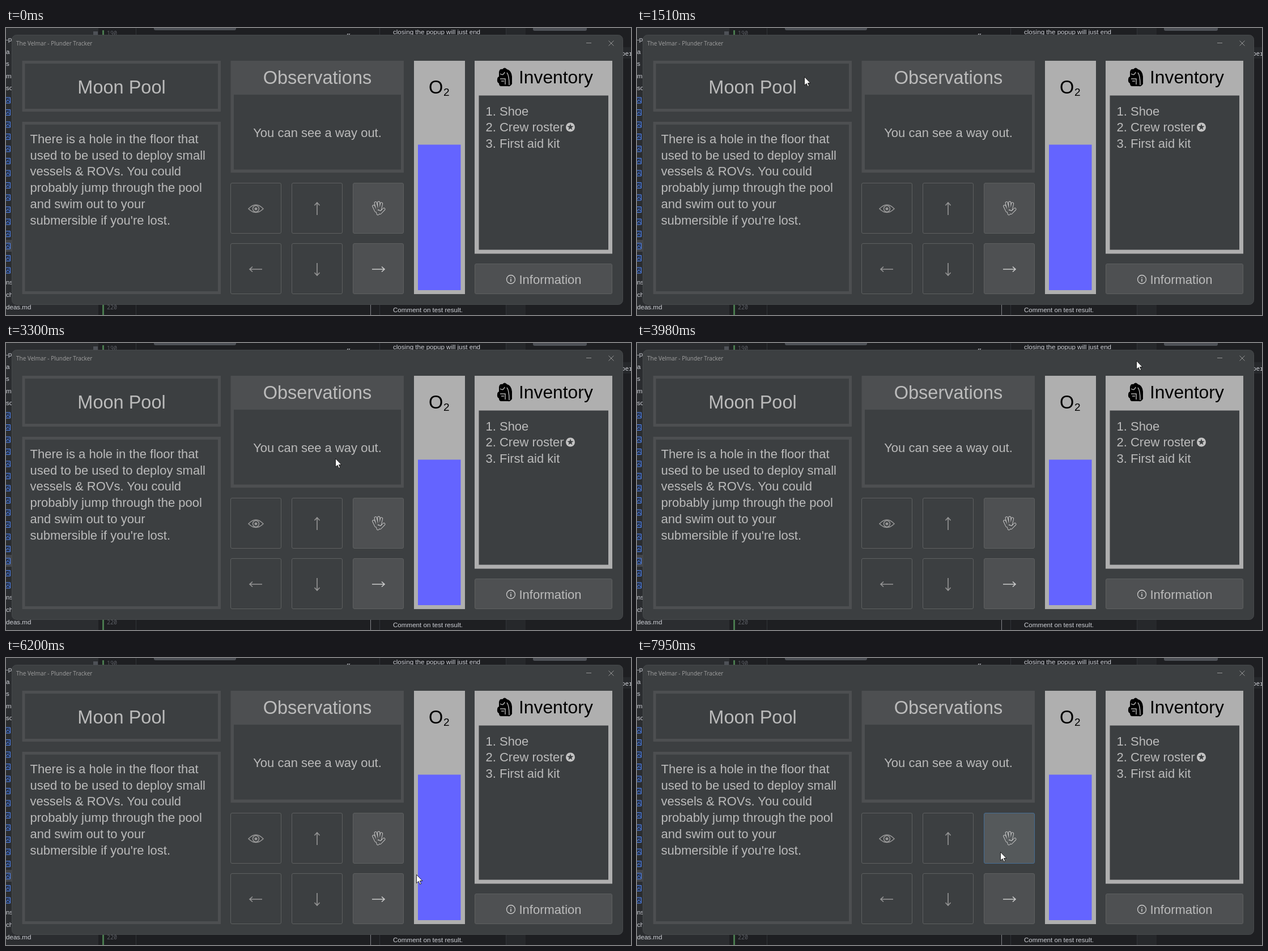
An HTML page that plays this animation: 1103x508 px, repeating every 8 s.

```html
<!DOCTYPE html>
<html lang="en">
<head>
<meta charset="utf-8">
<style>
html, body { margin: 0; width: 100%; height: 100%; overflow: hidden; background: #1e1f22; }
svg { display: block; width: 100vw; height: 100vh; font-family: "Liberation Sans", Arial, sans-serif; }
text { fill: #bbb; white-space: pre; }
.ide text { font-size: 11.6px; fill: #ced0d6; }
.ide .dim { fill: #5a5d63; font-family: "Noto Sans Mono", monospace; font-size: 10px; }
.big { font-size: 32.5px; }
.body { font-size: 22px; }
.mid { text-anchor: middle; }
.frame { fill: #3c3f41; stroke: #4d4f51; stroke-width: 5; }
.dark { fill: #3c3f41; }
.grey { fill: #4d4f51; }
.light { fill: #afafaf; }
.black { fill: #000; }
.line { fill: none; stroke: #969696; stroke-width: 1.6; }
.on .line { stroke: #ccc; }
.btn { --face: #3c3f41; --edge: #5e6060; }
.btn.on { --face: #4e5052; }
.btn.hover { --face: #55595b; --edge: #466d94; }
.btn > rect { fill: var(--face); stroke: var(--edge); }
.hand { fill: none; stroke-linecap: round; stroke-linejoin: round; }
</style>
</head>
<body>
<svg viewBox="0 0 1103 508" preserveAspectRatio="none">
  <g class="ide">
    <rect width="163" height="508" fill="#2b2d30"/>
    <rect y="375" width="163" height="21" fill="#43454a"/>
    <rect x="154" y="6" width="8" height="8" fill="#4e5157"/>
    <rect x="261" y="-4" width="145" height="8" rx="3" fill="#4e5157"/>
    <rect x="930" y="-3" width="95" height="8" rx="3" fill="#4e5157"/>
    <path d="M170 4h3v10h-3zM170 488h3v20h-3z" fill="#549159" opacity=".8"/>
    <path d="M229.5 0V508M659.5 0V508M882.5 0V508" stroke="#313438"/>
    <path d="M643.5 488V508" stroke="#85878c"/>
    <rect x="883" width="34" height="508" fill="#26282b"/>
    <rect x="1080" y="34" width="23" height="20" fill="#26282b"/>
    <text class="dim" x="178" y="13">190</text>
    <text class="dim" x="178" y="498">220</text>
    <text x="601" y="18">ff</text>
    <text x="683" y="11">closing the popup will just end</text>
    <text x="683" y="503">Comment on test result.</text>
    <text x="1086" y="49" style="font:11px 'Noto Sans Mono',monospace">per</text>
    <text x="0" y="498">deas.md</text>
    <g id="tree"></g>
  </g>

  <rect x="10.5" y="12.5" width="1078" height="477" rx="8" fill="#3c3f41" stroke="#46494b"/>
  <text x="18" y="31" style="font:10px 'Open Sans',sans-serif;fill:#a0a0a0">The Velmar - Plunder Tracker</text>
  <path class="line" d="M1024 26.5h9M1063.5 22.5l9 9m0 -9l-9 9" style="stroke-width:1"/>

  <rect class="frame" x="31" y="60.5" width="345.5" height="85"/>
  <text class="big mid" x="204" y="116">Moon Pool</text>
  <rect class="frame" x="31" y="168.5" width="345.5" height="300"/>
  <g id="story" class="body"></g>

  <rect class="grey" x="396.5" y="58" width="305.5" height="198"/>
  <rect class="dark" x="402" y="118" width="295" height="132.5"/>
  <text class="big mid" x="549.5" y="99">Observations</text>
  <text class="body mid" x="549.5" y="193">You can see a way out.</text>

  <rect class="light" x="720" y="58" width="90" height="413"/>
  <rect x="727" y="206.5" width="75.5" height="257.5" fill="#6464ff"/>
  <text class="big black" x="746" y="116">O<tspan x="772" y="119.5" font-size="19">2</tspan></text>

  <rect class="light" x="827" y="58" width="243" height="341.5"/>
  <rect class="dark" x="834.5" y="119.5" width="228.5" height="273"/>
  <path d="M870 78Q871 72 876 73Q880 68 884 73Q892 75 893 86V99Q890 104 886 103H874Q870 103 870 98Q866 96 867 91Q867 87 870 86Z"/>
  <path d="M872 81Q878 85 880 78M872 90H881V100M884 79Q888 84 888 101M874 94H879" fill="none" stroke="#afafaf" stroke-width="1.5"/>
  <text class="big black" x="905" y="98" style="font-size:31.8px">Inventory</text>
  <g id="items" class="body"></g>
  <circle cx="996" cy="175.5" r="8" fill="#c4c4c4"/>
  <path id="star" class="dark"/>

  <g id="buttons"></g>
  <path id="cursor" d="M.5 .5V15.5L4 12.3L6.4 17.5L8.7 16.5L6.4 11.5H11Z" fill="#fff" stroke="#111" stroke-width=".9"/>
</svg>
<script>
const $ = id => document.getElementById(id);
const LOOP = 8000;

const lines = (list, x, y) => list.map((s, i) =>
  `<text x="${x}" y="${y + i * 28.7}">${s}</text>`).join('');
$('story').innerHTML = lines(['There is a hole in the floor that', 'used to be used to deploy small',
  'vessels &amp; ROVs. You could', 'probably jump through the pool', 'and swim out to your',
  "submersible if you're lost."], 42.5, 204);
$('items').innerHTML = lines(['1. Shoe', '2. Crew roster', '3. First aid kit'], 846.5, 154.5);

// Points on an ellipse, counterclockwise between two angles in degrees.
const ring = (cx, cy, rx, ry, from, to, count) => Array.from({ length: count }, (_, i) => {
  const a = (from + (to - from) * i / (count - 1)) * Math.PI / 180;
  return [cx + rx * Math.cos(a), cy - ry * Math.sin(a)];
});

const outer = ring(996, 175.5, 6, 6, 90, 378, 5), inner = ring(996, 175.5, 2.4, 2.4, 126, 414, 5);
$('star').setAttribute('d', `M${outer.flatMap((p, i) => [p, inner[i]]).join('L')}Z`);

// Clipped project tree: image rows between the folder names.
const folders = ['-p', 'a', 's', 'ma', 'scr', 'ns9', 'chc'];
const icon = '<path d="M-2 -5H7.5V5H-2M0 3L3 -1L7 3M4.5 -2.5h1" fill="#25324d" stroke="#548af7"/>';
$('tree').innerHTML = folders.map((s, i) => `<text y="${24 + (i < 5 ? i : i + 15) * 21.5}">${s}</text>`).join('') +
  Array.from({ length: 15 }, (_, i) => `<g transform="translate(0 ${128 + i * 21.5})">${icon}</g>`).join('');

const arrow = angle => `<path class="line" transform="rotate(${angle})" d="M-11 0H11M6 -4.5L11 0L6 4.5"/>`;
const fingers = 'M-4 4L-8.5 -4M-2 1L-5.5 -10M1 0L0 -11M3.5 1L5 -9.5M4 7L10 0M-2 4L0 9L3 5Z';
const hand = `<g class="hand" transform="rotate(4)"><path d="${fingers}" stroke="#ccc" stroke-width="5"/>
  <path d="${fingers}" stroke="var(--face)" stroke-width="3.2"/></g>`;
const eye = `<path class="line" d="M-13 0Q0 -14 13 0Q0 13 -13 0Z"/><circle class="line" r="5.5"/><circle r="2.5" fill="#969696"/>`;
const info = `<circle class="line" cx="-57.5" r="7.5" style="stroke-width:1.3"/>
  <path class="line" d="M-57.5 -4v1.5m0 1.5v5"/><text class="body" x="-43" y="8">Information</text>`;

const pad = [eye, arrow(-90), hand, arrow(180), arrow(90), arrow(0)];
const buttons = pad.map((icon, i) => ({
  x: 396 + i % 3 * 108, y: i < 3 ? 274 : 381, w: 90, h: 90, icon, on: i % 3 === 2
}));
buttons.push({ x: 827, y: 417, w: 243, h: 54, icon: info, on: true });
$('buttons').innerHTML = buttons.map(({ x, y, w, h, icon, on }) =>
  `<g class="btn${on ? ' on' : ''}"><rect x="${x + .5}" y="${y + .5}" width="${w - 1}" height="${h - 1}" rx="2.5"/>
  <g transform="translate(${x + w / 2} ${y + h / 2 + 1})">${icon}</g></g>`).join('');
const buttonNodes = [...$('buttons').children];

// Pointer strokes, each continuing from where the pointer rested.
const strokes = [];
let rest = [1040, 560];
function move(start, end, count, ...path) {
  strokes.push({ start, end, count, path: [rest, ...path] });
  rest = path.at(-1);
}
move(210, 690, 8, [223, 106]);
move(950, 1720, 12, ...ring(207, 103, 152, 60, 150, 350, 5), [295, 86], [245, 58], [175, 43]);
move(1790, 2550, 12, ...ring(218, 105, 121, 57, 180, 450, 4), [139, 170], [310, 190]);
move(2610, 2680, 2, [354, 181]);
move(3230, 3980, 12, ...ring(800, 135, 244, 104, 225, 410, 4), [881, 31]);
move(4050, 4800, 12, ...ring(904, 144, 106, 114, 150, 570, 8));
move(4870, 5210, 6, ...ring(905, 202, 95, 59, 240, 360, 4), [1000, 159], [994, 144]);
move(5360, 6100, 12, [850, 4], [680, 150], [665, 325]);
move(6200, 6310, 3, [724, 383], [750, 415], [759, 431]);
move(6570, 7330, 12, ...ring(760, 240, 79, 195, -45, 100, 4), [685, 130], [621, 254]);
move(7400, 7950, 9, [650, 335], [641, 343]);

// Catmull-Rom curve through the points.
function along(points, share) {
  const last = points.length - 1;
  const i = Math.min(Math.floor(share * last), last - 1), u = share * last - i;
  const [a, b, c, d] = [-1, 0, 1, 2].map(k => points[Math.max(0, Math.min(last, i + k))]);
  return [0, 1].map(k => b[k] + u / 2 * (c[k] - a[k] +
    u * (2 * a[k] - 5 * b[k] + 4 * c[k] - d[k] + u * (3 * (b[k] - c[k]) + d[k] - a[k]))));
}

function pointerAt(time) {
  const stroke = strokes.findLast(s => time >= s.start);
  if (!stroke) return null;
  const { start, end, count, path } = stroke;
  const step = Math.floor((time - start) / (end - start) * (count - 1) + .2);
  return along(path, Math.min(step + 1, count) / count);
}

function draw(time) {
  const spot = pointerAt(time);
  $('cursor').style.display = spot ? '' : 'none';
  if (spot) $('cursor').setAttribute('transform', `translate(${spot.map(Math.round)})`);
  buttons.forEach(({ x, y, w, h, on }, i) => {
    const over = on && spot && spot[0] >= x && spot[0] < x + w && spot[1] >= y && spot[1] < y + h;
    buttonNodes[i].classList.toggle('hover', Boolean(over));
  });
}

const begin = performance.now();
function tick() {
  draw((performance.now() - begin) % LOOP);
  requestAnimationFrame(tick);
}
tick();
</script>
</body>
</html>
```
